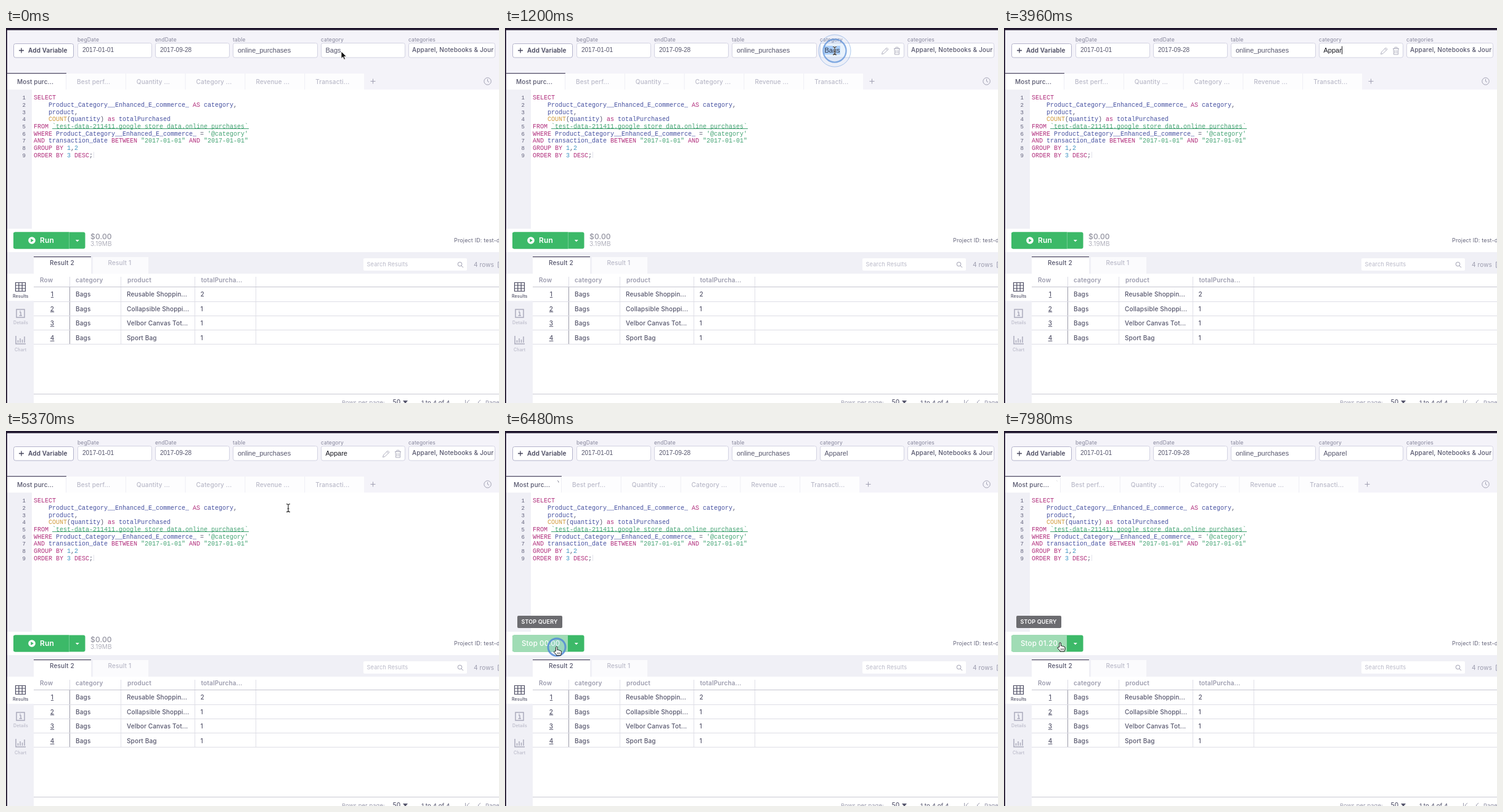
An HTML page that plays this animation: 800x609 px, repeating every 8000 ms.

```html
<!DOCTYPE html>
<html lang="en">
<head>
<meta charset="utf-8">
<title>Query editor</title>
<style>
html, body { margin: 0; width: 100%; height: 100%; overflow: hidden; background: #fff; }
svg { display: block; width: 100%; height: 100%; }
text { font-family: Inter, sans-serif; letter-spacing: .15px; white-space: pre; }
.field { font-family: "Liberation Sans", Arial, sans-serif; letter-spacing: 0; }
.code { font-family: "Liberation Mono", monospace; letter-spacing: 0; }
</style>
</head>
<body>
<svg viewBox="0 0 800 609"><g id="page"></g><g id="live"></g></svg>
<script>
const LOOP = 8000, START = 6440;
const INK = '#55556c', SOFT = '#9c9cae', PALE = '#b9b9c8', BG = '#f4f3f9';

const text = (x, y, s, fill = INK, size = 10, weight = 500, more = '') =>
  `<text x="${x}" y="${y}" fill="${fill}" font-size="${size}" font-weight="${weight}" ${more}>${s}</text>`;
const rect = (x, y, w, h, fill, more = '') =>
  `<rect x="${x}" y="${y}" width="${w}" height="${h}" fill="${fill}" ${more}/>`;
const path = (d, stroke, width = 1, fill = 'none', more = '') =>
  `<path d="${d}" stroke="${stroke}" stroke-width="${width}" fill="${fill}" ${more}/>`;
const circle = (x, y, r, fill, more = '') =>
  `<circle cx="${x}" cy="${y}" r="${r}" fill="${fill}" ${more}/>`;
const field = (x, y, s, fill = INK, size = 11) => text(x, y, s, fill, size, 400, 'class="field"');

function header() {
  const boxes = [[116, 237, 'begDate'], [242, 363, 'endDate'], [368, 506, 'table'],
    [511, 648, 'category'], [653, 794, 'categories']];
  return rect(0, 0, 800, 100, BG) +
    rect(12.5, 25.5, 97, 22.5, '#fff', 'rx="3" stroke="#b4b4cb"') +
    path('M21 36.5h8M25 32.5v8', '#45455c', 1.3) +
    text(36, 40.3, 'Add Variable', '#45455c', 10, 600) +
    boxes.map(([l, r, name]) =>
      rect(l + .5, 24.5, r - l - 1, 23.5, '#fff', 'rx="3" stroke="#d3d3e2"') +
      text(l, 22, name, '#85859b', 8.5, 400)).join('') +
    field(124, 39, '2017-01-01', INK, 10) + field(250, 39, '2017-09-28', INK, 10) +
    field(376, 39.5, 'online_purchases') +
    `<svg x="0" y="0" width="792" height="60">${text(659, 39.3, 'Apparel, Notebooks &amp; Journals')}</svg>` +
    circle(781.5, 86.5, 5.7, 'none', 'stroke="#a0a0b2"') + path('M781.5 83v3.7l2.5 1.3', '#a0a0b2');
}

// Each token is a colour key followed by its text.
const TINT = { k: '#b02d7b', i: '#4550a0', f: '#d19b3d', s: '#43a373', n: '#4296c4', p: '#55556c' };
const CODE = [
  'k:SELECT',
  'i:    Product_Category__Enhanced_E_commerce_ |k:AS|i: category|p:,',
  'i:    product|p:,',
  'f:    COUNT|p:(|i:quantity|p:) |k:as|i: totalPurchased',
  'k:FROM |s:`test-data-211411.google_store_data.online_purchases`',
  "k:WHERE |i:Product_Category__Enhanced_E_commerce_|p: = |s:'@category'",
  'k:AND |i:transaction_date |k:BETWEEN |s:"2017-01-01" |k:AND |s:"2017-01-01"',
  'k:GROUP BY |n:1|p:,|n:2',
  'k:ORDER BY |n:3 |k:DESC|p:;'];

function editor() {
  const lines = CODE.map((line, i) => {
    const y = (116.3 + i * 11.68).toFixed(1);
    const spans = line.split('|').map(s => `<tspan fill="${TINT[s[0]]}">${s.slice(2)}</tspan>`).join('');
    return text(32, y, i + 1, '#60607a', 9, 400, 'class="code" text-anchor="end"') +
      text(45, y, spans, INK, 10, 400, 'class="code"');
  });
  return rect(0, 100, 800, 264, '#fff') + rect(2, 100, 40, 226, '#f0f0f6') + lines.join('') +
    path('M75 163.5H394', '#43a373') + path('M142.5 201v10', '#e3e3ec') +
    text(727, 347.5, 'Project ID: test-data', '#66667c', 9, 400);
}

function sidebar() {
  return rect(2, 364, 43, 245, '#f0f0f6') + rect(2, 399, 43, 44, '#fff') +
    path('M15.5 413.5h16v14h-16zM15.5 418h16M15.5 423h16M20.8 413.5v14M26.2 413.5v14', '#4c4c63', 1.2) +
    text(11, 437.8, 'Results', '#4c4c63', 7) +
    rect(17, 457, 13, 13, 'none', 'stroke="#aaaabc" stroke-width="1.5"') +
    path('M22 462h2v5M21.5 467h4.5M23 459v1.6', '#aaaabc', 1.4) +
    text(12, 481, 'Details', PALE, 7) +
    path('M16 500v13h16M19.5 511v-4M23 511v-7M26.5 511v-5M30 511v-10', '#aaaabc', 1.5) +
    text(14, 524.5, 'Chart', PALE, 7);
}

function results() {
  const rows = [['Reusable Shoppin...', 2], ['Collapsible Shoppi...', 1],
    ['Velbor Canvas Tot...', 1], ['Sport Bag', 1]];
  const heads = [[55, 'Row'], [113, 'category'], [197, 'product'], [316.5, 'totalPurcha...']];
  return rect(2, 364, 798, 35, '#f0f0f6') + rect(45, 399, 755, 210, '#fff') + sidebar() +
    rect(45, 371, 93, 30, '#fff') + rect(45, 371, 93, 1.2, '#4a4560') +
    rect(141, 372, 90, 27, '#fbfbfd') +
    text(71, 385, 'Result 2') + text(165.5, 385, 'Result 1', PALE) +
    rect(580, 374, 168, 20, '#fff', 'rx="2"') + text(585.5, 387, 'Search Results', PALE, 9.2, 400) +
    circle(736.5, 383.5, 3.3, 'none', 'stroke="#a0a0b2"') + path('M739 386l3 3', '#a0a0b2') +
    text(759, 388, '4 rows', SOFT, 10, 400) + path('M801 380h-2.5v9h2.5', '#a0a0b2') +
    heads.map(([x, s]) => text(x, 413.3, s, SOFT, 10, 600)).join('') +
    path('M186.5 404V514M306.5 404V514M405.5 404V514', '#e0e0e8') +
    path('M103.5 404V420', '#dcdce4') + path('M103.5 420V514', '#9a9aa8') +
    path('M45 420.5H800', '#c6c6d0') +
    rows.map(([name, n], i) => {
      const y = 436 + i * 23.6;
      return text(75, y, i + 1, INK, 10, 500, 'text-anchor="middle" text-decoration="underline"') +
        text(113, y, 'Bags') + text(196, y, name) + text(315.5, y, n) +
        path(`M45 ${[444.5, 467.5, 490.5, 513.5][i]}H800`, '#dedee6');
    }).join('') +
    path('M45 594.5H800', '#c9c9d2') +
    text(545, 611.5, 'Rows per page:', SOFT, 9.2, 400) + text(627.5, 611, '50', INK) +
    path('M644 605h8l-4 5z', 'none', 0, INK) + text(674, 611.5, '1 to 4 of 4', '#66667c', 9.5) +
    path('M745.5 604v8M752 604l-4 4 4 4M770 604l-4 4 4 4', SOFT) + text(778, 611.5, 'Page', SOFT, 9.2);
}

function tabs(t) {
  const busy = t >= START, shift = busy ? -6 : 0, right = 98 + shift;
  const names = ['Best perf...', 'Quantity ...', 'Category ...', 'Revenue ...', 'Transacti...'];
  let out = rect(2, 74, 579 + shift, 26, '#fdfdfe') + rect(2, 73, right - 2, 27, '#fff') +
    rect(2, 73, right - 2, 1.2, '#4a4560') + text(busy ? 14 : 18, 91, 'Most purc...', INK) +
    names.map((s, i) => path(`M${right + i * 96.8 - .5} 74v26`, '#eeeef4') +
      text(right + 17 + i * 96.8, 91, s, PALE)).join('') +
    path(`M${591.5 + shift} 86.5h8m-4-4v8`, '#a0a0b2');
  if (busy) {
    // Arc that turns while its length swells and shrinks.
    const len = .26 - .24 * Math.cos((t - 7980) / 1786 * 2 * Math.PI);
    const a = Math.PI + (t - 6960) / 1020 * 2.75 * Math.PI, b = a + len * 2 * Math.PI;
    const at = v => `${82.5 + 4.6 * Math.cos(v)} ${84 + 4.6 * Math.sin(v)}`;
    out += path(`M${at(a)}A4.6 4.6 0 ${+(len > .5)} 1 ${at(b)}`, '#77778a');
  }
  return out;
}

function category(t) {
  const typed = [2460, 3000, 3300, 3600, 3900, 4200, 5580].filter(k => t >= k).length;
  const word = typed ? 'Apparel'.slice(0, typed) : 'Bags';
  const focused = t >= 1060 && t < START;
  let out = '';
  if (focused && !typed) out += rect(518, 29, 26, 14, '#b3d4fc');
  out += field(518.5, 39.6, word, focused ? '#16161e' : INK);
  if (typed && t < 4500) out += path(`M${[0, 526.5, 532.5, 538.5, 544.5, 548.5, 554.5][typed]} 29.5v13`, '#16161e');
  if (t >= 600 && t < 5580)
    out += path('M611.5 42.5l1-3.5 7-7 2.5 2.5-7 7zM618 33.5l2.5 2.5', '#adadbd') +
      path('M631 33.5h10M634 33v-1.7h4v1.7M632 34l.5 9h7l.5-9M634.5 36v5M637.5 36v5', '#adadbd');
  return out;
}

function runBar(t) {
  const green = '#3cb968', busy = t >= START;
  const main = busy ? '#a0dcb5' : t >= 5950 ? '#56c37f' : green;
  let out = rect(12, 331.5, 116.5, 27, green, 'rx="3"') +
    path('M15 331.5H102V358.5H15a3 3 0 0 1-3-3V334.5a3 3 0 0 1 3-3z', 'none', 0, main) +
    path('M102.5 332v26', busy ? green : '#6fcc92') + path('M112.8 344h6l-3 3.2z', 'none', 0, '#fff');
  if (!busy) return out + circle(42, 345, 5.8, '#fff') + path('M40.3 342l4.6 3-4.6 3z', 'none', 0, main) +
    text(55, 349.2, 'Run', '#fff', 12, 600) + text(137, 343.3, '$0.00', '#92929f', 12) +
    text(137, 354.3, '3.19MB', '#b0b0bc', 10, 400);
  const time = Math.floor((t - START) * .784 / 100) / 10;
  return out + text(27, 349.2, 'Stop ' + time.toFixed(2).padStart(5, '0'), '#fff', 11.5) +
    rect(20, 300, 73, 20, '#6c6c70', 'rx="2"') + text(26.5, 313.3, 'STOP QUERY', '#fff', 9, 600);
}

const TRACK = [[0, 544, 38], [780, 535, 37], [4770, 535, 37], [5370, 458, 125],
  [6090, 84, 351], [6960, 83, 350], [7980, 91, 344], [LOOP, 91, 344]];

function pointer(t) {
  const i = TRACK.findIndex(k => k[0] > t), [t0, x0, y0] = TRACK[i - 1], [t1, x1, y1] = TRACK[i];
  const u = (t - t0) / (t1 - t0), e = u * u * (3 - 2 * u);
  const x = x0 + (x1 - x0) * e, y = y0 + (y1 - y0) * e;
  const place = `transform="translate(${x} ${y})" stroke-linejoin="round"`;
  if (t >= 2460 && t < 4770) return '';
  if (x < 128 && y > 331)
    return path('M-1.2 7V1a1.3 1.3 0 0 1 2.6 0V5q2-.8 2.4.6 2-.5 2.3.8 1.9-.2 1.9 1.3V10q0 1.5-1 3v1H0v-1L-4 8.7q-.4-1.6 1-1.6z', '#111', 1, '#fff', place) +
      path('M1.5 9v3M3.5 9v3M5.5 9v3', '#111', .7, 'none', place);
  if (t < 600 || x < 42 || y > 326)
    return path('M0 0V11.5L2.7 9 4.6 13.3 6.6 12.4 4.7 8.3H8.4z', '#fff', .8, '#111', place);
  const beam = 'M-3-6.5q3 0 3 2v9q0 2-3 2M3-6.5q-3 0-3 2v9q0 2 3 2M-1.5 1h3';
  return path(beam, '#fff', 2.4, 'none', place) + path(beam, '#222', 1.1, 'none', place);
}

function ripple(t, start, x, y) {
  const age = t - start;
  if (age < 0 || age > 400) return '';
  return circle(x, y, 8 + age * .075, '#7fb0ee', `fill-opacity="${.18 * (1 - age / 400)}" stroke="#4d86d6"
    stroke-width="${Math.max(1, 4 - age * .0125)}" stroke-opacity="${1 - age / 430}"`);
}

const live = document.getElementById('live');
document.getElementById('page').innerHTML = header() + editor() + results() +
  rect(0, 0, 800, 3.5, '#1e152c') + rect(0, 0, 1.8, 609, '#1e152c');

function draw(now) {
  const t = now % LOOP;
  live.innerHTML = tabs(t) + category(t) + runBar(t) +
    ripple(t, 960, 535, 37) + ripple(t, 1060, 535, 37) + ripple(t, 6400, 84, 351) + pointer(t);
  requestAnimationFrame(draw);
}
requestAnimationFrame(draw);
</script>
</body>
</html>
```
